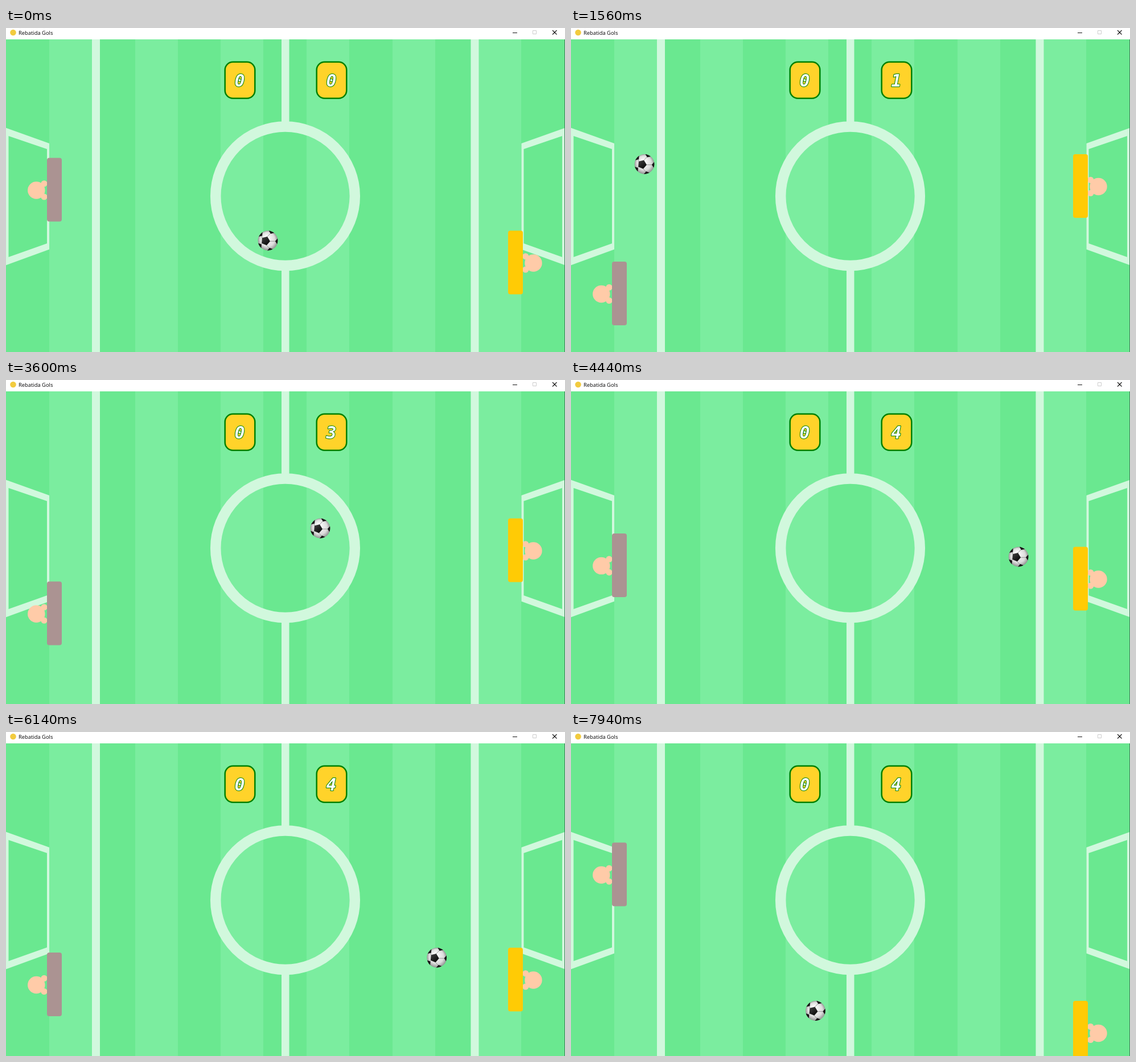
Recreate the animation shown at these times as an HTML page with a canvas. Size 982 by 570 pixels, loop 8000 ms.

```html
<!DOCTYPE html>
<html lang="pt">
<head>
<meta charset="utf-8">
<title>Rebatida Gols</title>
<style>
html, body { margin: 0; width: 100%; height: 100%; overflow: hidden; }
canvas { display: block; width: 982px; height: 570px; }
</style>
</head>
<body>
<canvas id="stage" width="982" height="570"></canvas>
<script>
const ctx = document.getElementById('stage').getContext('2d');
const W = 982, H = 570, LOOP = 8000;
const DARK = '#6ae890', LIGHT = '#7bed9f', LINE = '#d1f8dd', SKIN = '#ffcba8';
const RIGHT_HIT = 863.5, LEFT_HIT = 115.5, GOAL = -17;
const START = { x: 490, y: 296 }, SLOPE = 0.0512;
const FIRST_RUN = 477;                                        // opening shot to the goal
const SERVE_RUN = 2 * RIGHT_HIT - START.x - GOAL;             // serve, right paddle, goal

// [step, value] pairs
const travel = [[0, 0], [6, 738], [14, 1706], [20, 2431.5], [24, 2952], [30, 3670],
  [34, 4177], [45, 5490], [57, 6940.5], [66, 8038.5]];
const leftPaddle = [[0, 228.5], [6, 227.5], [13, 411], [14, 395], [20, 322], [26, 410],
  [28, 381], [30, 354.5], [36.5, 270], [41.75, 269], [45, 311], [51, 388], [66, 194.5]];

function lerpKeys(keys, k) {
  let i = 1;
  while (i < keys.length - 1 && keys[i][0] < k) i++;
  const [k0, v0] = keys[i - 1], [k1, v1] = keys[i];
  return v0 + (v1 - v0) * (k - k0) / (k1 - k0);
}

function stepAt(t) {
  return t < 4580 ? Math.min(37, Math.floor(t / 120)) : 38 + Math.floor((t - 4580) / 120);
}

function ballAt(k) {
  const s = lerpKeys(travel, k);
  if (s < FIRST_RUN) return { x: 460 - s, y: 374 + SLOPE * s, score: 0 };
  const score = Math.min(4, 1 + Math.floor((s - FIRST_RUN) / SERVE_RUN));
  const d = s - FIRST_RUN - (score - 1) * SERVE_RUN;
  const y = START.y + SLOPE * d * (score % 2 ? -1 : 1);
  let x = START.x + d;
  if (score < 4) {
    if (x > RIGHT_HIT) x = 2 * RIGHT_HIT - x;
  } else {
    const span = RIGHT_HIT - LEFT_HIT;
    const p = (x - LEFT_HIT) % (2 * span);
    x = LEFT_HIT + (p < span ? p : 2 * span - p);
  }
  return { x, y, score };
}

function rect(x, y, w, h, color) {
  ctx.fillStyle = color;
  ctx.fillRect(x, y, w, h);
}

function disc(x, y, r, color) {
  ctx.fillStyle = color;
  ctx.beginPath();
  ctx.arc(x, y, r, 0, 7);
  ctx.fill();
}

function poly(points, color) {
  ctx.fillStyle = color;
  ctx.beginPath();
  points.forEach(([x, y]) => ctx.lineTo(x, y));
  ctx.closePath();
  ctx.fill();
}

function stroke(points, color, width) {
  ctx.strokeStyle = color;
  ctx.lineWidth = width;
  ctx.beginPath();
  points.forEach(([x, y]) => ctx.lineTo(x, y));
  ctx.stroke();
}

function roundBox(x, y, w, h, r, color) {
  ctx.fillStyle = color;
  ctx.beginPath();
  ctx.roundRect(x, y, w, h, r);
  ctx.fill();
}

function drawGoal(flip) {
  const side = pts => pts.map(([x, y]) => [flip ? 981.5 - x : x, y]);
  poly(side([[-1, 175.5], [76, 203], [76, 389.5], [-1, 417.5]]), LINE);
  poly(side([[4.5, 190], [72, 213], [72, 379], [4.5, 403]]), DARK);
}

function drawField() {
  rect(0, 0, W, H, DARK);
  for (let i = 0; i < 6; i++) {
    const x = Math.round(76 + i * 150.7);
    rect(x, 20, 75, H, LIGHT);
  }
  rect(151, 20, 14, H, LINE);
  rect(816.5, 20, 14, H, LINE);
  rect(484, 20, 13.5, 146, LINE);
  rect(484, 425, 13.5, 145, LINE);
  ctx.strokeStyle = LINE;
  ctx.lineWidth = 18.5;
  ctx.beginPath();
  ctx.arc(490.5, 295.7, 122.3, 0, 7);
  ctx.stroke();
  drawGoal(false);
  drawGoal(true);
}

function drawTitleBar() {
  rect(0, 0, W, 20, '#fff');
  disc(12.5, 8, 5.3, '#f2cb3f');
  ctx.fillStyle = '#000';
  ctx.font = '9.4px "Open Sans", "Noto Sans", sans-serif';
  ctx.textAlign = 'left';
  ctx.fillText('Rebatida Gols', 22, 11.5);
  stroke([[890, 8.5], [898, 8.5]], '#111', 1);
  ctx.strokeStyle = '#ccc';
  ctx.strokeRect(925.5, 4.5, 6, 6);
  stroke([[960, 4], [967.5, 11.5]], '#111', 1.1);
  stroke([[967.5, 4], [960, 11.5]], '#111', 1.1);
}

function drawScore(x, value) {
  ctx.beginPath();
  ctx.roundRect(x + 1.2, 59.7, 52.6, 64, 14);
  ctx.fillStyle = '#ffd32a';
  ctx.fill();
  ctx.strokeStyle = '#008000';
  ctx.lineWidth = 2.5;
  ctx.stroke();
  ctx.font = 'italic bold 30px "DejaVu Sans Mono", monospace';
  ctx.textAlign = 'center';
  ctx.lineJoin = 'round';
  ctx.lineWidth = 2;
  ctx.strokeText(value, x + 27, 103);
  ctx.fillStyle = '#fff';
  ctx.fillText(value, x + 27, 103);
}

function drawKeeper(top, headX, handX, paddleX, color) {
  disc(headX, top + 57, 15.2, SKIN);
  disc(handX, top + 45.3, 5.6, SKIN);
  disc(handX, top + 68.5, 5.6, SKIN);
  roundBox(paddleX, top, 26, 112, 4, color);
}

const polar = (r, a) => [r * Math.cos(a), r * Math.sin(a)];

function drawBall(x, y) {
  ctx.save();
  ctx.translate(x, y);
  ctx.beginPath();
  ctx.arc(0, 0, 17.4, 0, 7);
  ctx.clip();
  const shade = ctx.createRadialGradient(-2, -6, 3, 0, 0, 18);
  shade.addColorStop(0, '#f8f8f8');
  shade.addColorStop(0.65, '#dcdcdc');
  shade.addColorStop(1, '#8c8c8c');
  rect(-18, -18, 36, 36, shade);
  const core = [];
  for (let i = 0; i < 5; i++) {
    const a = i * Math.PI * 0.4 + 0.08;
    const [px, py] = polar(8, a), v = [px - 4, py + 0.5];
    core.push(v);
    stroke([v, polar(15, a)], '#8f8f8f', 0.9);
    const [cx, cy] = polar(18.3, a);
    poly([0, 1, 2, 3, 4].map(j => {
      const [dx, dy] = polar(5.3, a + Math.PI + j * Math.PI * 0.4);
      return [cx + dx, cy + dy];
    }), '#151515');
  }
  const ink = ctx.createLinearGradient(-8, -6, 2, 8);
  ink.addColorStop(0, '#3a3a3a');
  ink.addColorStop(1, '#050505');
  poly(core, ink);
  ctx.restore();
}

function draw(t) {
  const k = stepAt(t), ball = ballAt(k);
  const by = Math.round(ball.y * 2) / 2;
  drawField();
  drawScore(383.5, '0');
  drawScore(544.5, String(ball.score));
  drawKeeper(lerpKeys(leftPaddle, k), 53.3, 67, 72, '#ab9392');
  drawKeeper(by - 17.5, 926.5, 912.7, 882, '#ffcb05');
  drawBall(ball.x, by);
  rect(981, 20, 1, H, '#3f7f58');
  drawTitleBar();
}

const began = performance.now();
function tick() {
  draw((performance.now() - began) % LOOP);
  requestAnimationFrame(tick);
}
tick();
</script>
</body>
</html>
```
